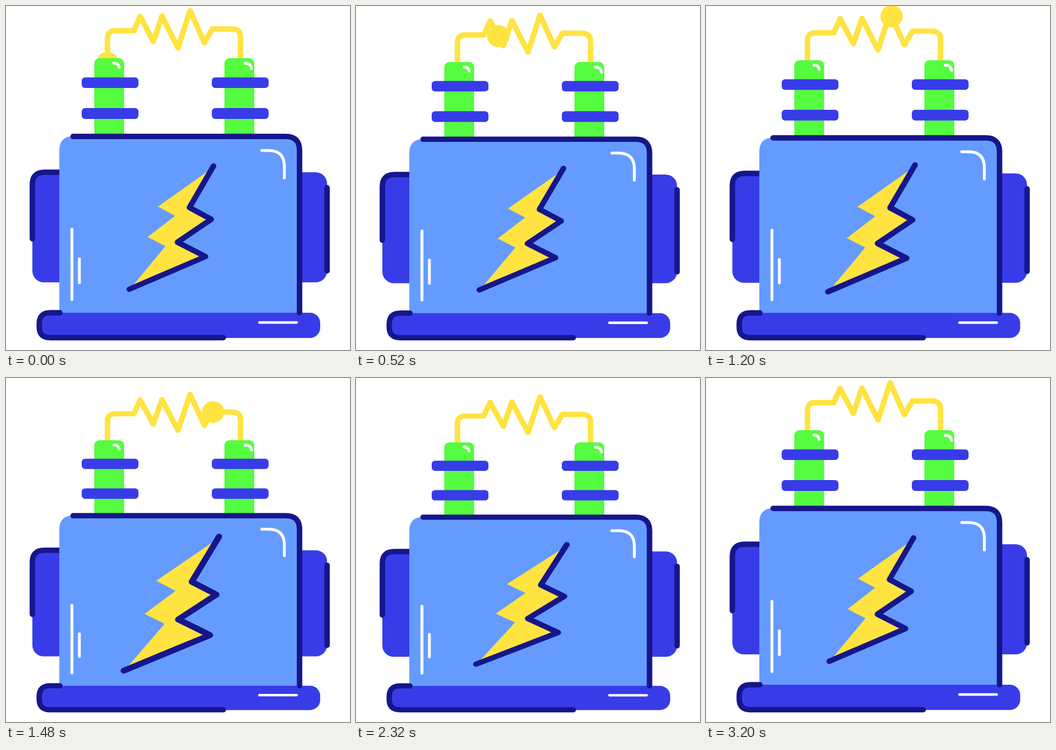
Animation of 600 by 600 pixels, one loop 3.24 s. Source, as an HTML page:

```html
<!DOCTYPE html>
<html lang="en">
<head>
<meta charset="utf-8">
<title>Transformer</title>
<style>
  html, body { margin: 0; width: 100%; height: 100%; overflow: hidden; background: #fff; }
  svg { display: block; width: 100%; height: 100%; }
  .line { fill: none; stroke: #16168c; stroke-width: 9.5; stroke-linecap: round; stroke-linejoin: round; }
  .shine { fill: none; stroke: #fff; stroke-width: 5; stroke-linecap: round; }
  .blue { fill: #383ce8; }
  .green { fill: #55fc3f; }
  .yellow { fill: #ffe341; }
  #wire { fill: none; stroke: #ffe341; stroke-width: 9.5; stroke-linejoin: round; }
</style>
</head>
<body>
<svg viewBox="0 0 600 600">
  <defs>
    <g id="insulator">
      <rect class="green" x="154" y="91" width="52" height="150" rx="9"/>
      <rect class="blue" x="132" y="124.5" width="99" height="18.5" rx="6"/>
      <rect class="blue" x="132" y="178" width="99" height="19" rx="6"/>
    </g>
  </defs>
  <g id="machine">
    <path id="wire" d="M177 99.5V57Q177 43 191 43H223L234 18L257 62L272 17.5L300 73L321 8L346 64L360 40H394Q409 40 409 54V200"/>
    <circle id="ball" class="yellow" r="19.5"/>

    <use href="#insulator"/>
    <use href="#insulator" x="227"/>
    <path class="shine" d="M188 99.5Q196 99.5 197.5 107M417 100Q427 99 428 109"/>

    <rect class="blue" x="46" y="290" width="80" height="192" rx="20"/>
    <rect class="blue" x="480" y="290" width="80" height="192" rx="20"/>
    <path class="line" d="M94 290H67Q46 290 46 311V406M560 317V462"/>

    <path fill="#659bff" d="M93 536V252Q93 227 118 227H488Q512 227 512 252V536Z"/>
    <rect class="blue" x="55" y="535" width="493" height="44" rx="18"/>
    <path class="line" d="M117 227.5H488Q512 227.5 512 252V535"/>
    <path class="line" d="M94 535H77Q58 535 58 554V560Q58 578.5 77 578.5H379"/>

    <path class="shine" d="M446 252H458Q485.5 252 485.5 280V300M115 389.5V512M128 441V482.5"/>
    <path class="shine" style="stroke-width:4.5" d="M442 552H507"/>

    <g id="bolt">
      <path class="yellow" d="M362 281L265 350L295 366L247 403L278 419L215 495L348 437L299 412L358 372L320 351.5Z"/>
      <path class="line" d="M362 279L320 351.5L358 372L299 412L348 437L215 494"/>
    </g>
  </g>
</svg>
<script>
  const LOOP = 3240, STEP = 40;
  const SQUASH_PERIOD = LOOP / 5, BALL_SPEED = 0.2985;
  const [machine, wire, ball, bolt] =
    ['machine', 'wire', 'ball', 'bolt'].map(id => document.getElementById(id));
  const wireLength = wire.getTotalLength();

  // [time, scale] keys for the bolt, eased in and out between keys
  const boltX = [[0, 1], [950, 1], [2000, 1.257], [2600, 0.93], [3130, 1.003], [LOOP, 1]];
  const boltY = [[0, 1], [950, 1], [1850, 1.2], [2600, 0.93], [3130, 1.003], [LOOP, 1]];

  const easeInOut = u => (1 - Math.cos(Math.PI * u)) / 2;

  function sample(keys, t) {
    const i = keys.findIndex(key => key[0] > t);
    const [t0, v0] = keys[i - 1], [t1, v1] = keys[i];
    return v0 + (v1 - v0) * easeInOut((t - t0) / (t1 - t0));
  }

  function squash(t) {
    const a = 2 * Math.PI * (t + 20) / SQUASH_PERIOD;
    return 0.515 * (0.981 - Math.cos(a)) - 0.035 * (Math.cos(2 * a) - 0.925);
  }

  const scaleAbout = (x, y, sx, sy) =>
    `translate(${x} ${y}) scale(${sx} ${sy}) translate(${-x} ${-y})`;

  function draw(t) {
    machine.setAttribute('transform', scaleAbout(0, 583, 1, 1 - 0.0465 * squash(t)));
    bolt.setAttribute('transform', scaleAbout(288.5, 386.5, sample(boltX, t), sample(boltY, t)));
    const p = wire.getPointAtLength(Math.min(t * BALL_SPEED, wireLength));
    ball.setAttribute('cx', p.x);
    ball.setAttribute('cy', p.y);
  }

  const start = performance.now();
  function tick() {
    const t = (performance.now() - start) % LOOP;
    draw(Math.floor(t / STEP) * STEP);
    requestAnimationFrame(tick);
  }
  draw(0);
  requestAnimationFrame(tick);
</script>
</body>
</html>
```
